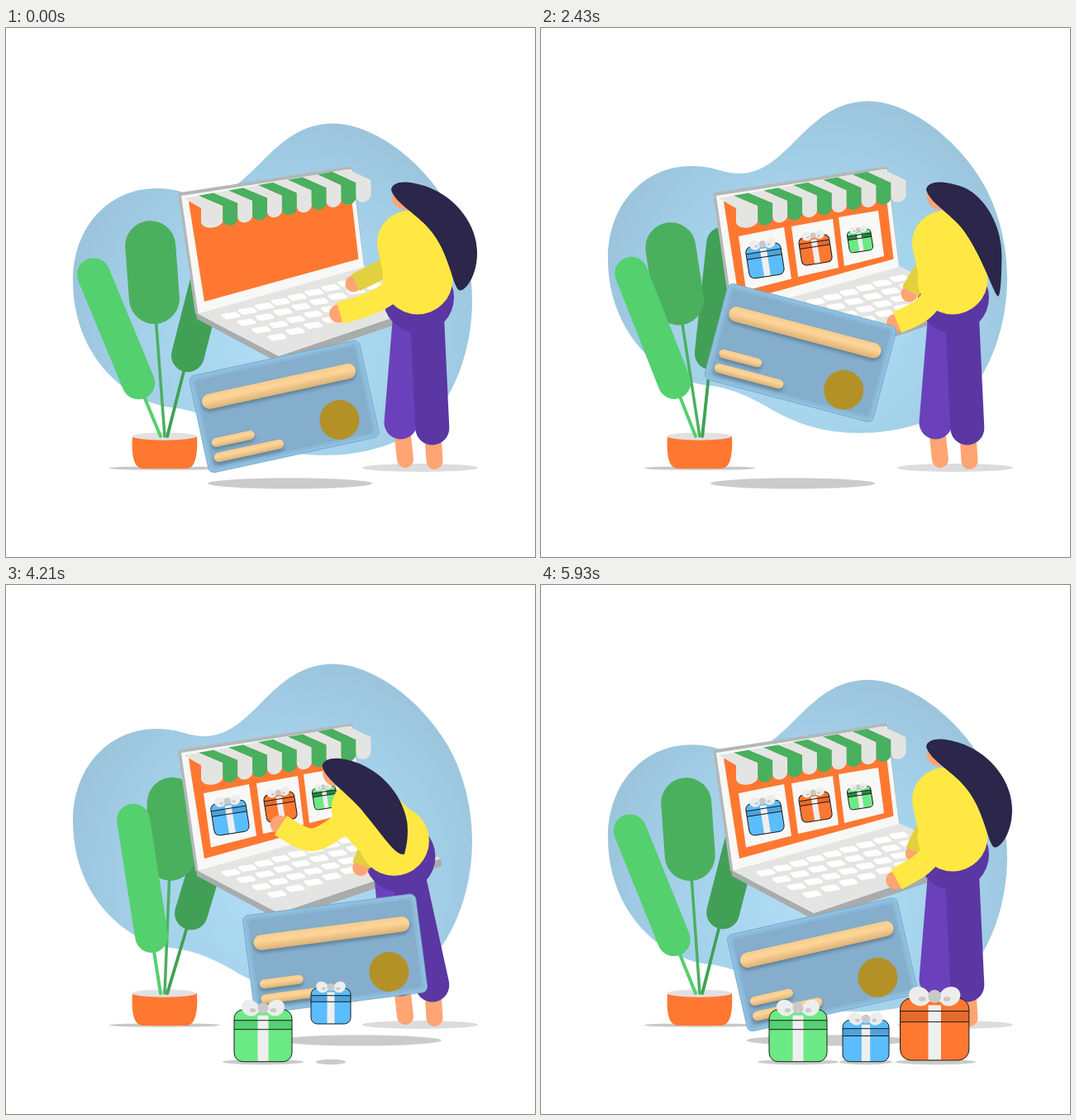
Animation of 640 by 640 pixels, one loop 6 s. Source, as an HTML page with a canvas:

```html
<!DOCTYPE html>
<html lang="en">
<head>
<meta charset="utf-8">
<title>Online shopping</title>
<style>
html, body { margin: 0; width: 100%; height: 100%; overflow: hidden; background: #fff; }
canvas { display: block; width: 640px; height: 640px; }
</style>
</head>
<body>
<canvas id="stage" width="640" height="640"></canvas>
<script>
const g = document.getElementById('stage').getContext('2d');
const LOOP = 6000, STEP = LOOP / 84, RAD = Math.PI / 180;
const ORANGE = '#ff7831', SKIN = '#ffa573', YELLOW = '#ffe844', PURPLE = '#5a37a2', PALE = '#e4e5e3';

// Value rows at time t. Each row is [time, ...values].
function track(rows, t, mode) {
  const last = rows.length - 1;
  if (t <= rows[0][0]) return rows[0].slice(1);
  if (t >= rows[last][0]) return rows[last].slice(1);
  let i = 0;
  while (t >= rows[i + 1][0]) i++;
  const a = rows[i], b = rows[i + 1], span = b[0] - a[0];
  let u = (t - a[0]) / span;
  if (mode === 'ease') u = u * u * (3 - 2 * u);
  if (mode !== 'smooth') return a.slice(1).map((v, k) => v + (b[k + 1] - v) * u);
  const p = rows[i - 1] || rows[last - 1], n = rows[i + 2] || rows[1];
  const tp = i ? p[0] : p[0] - LOOP, tn = i + 2 <= last ? n[0] : n[0] + LOOP;
  return a.slice(1).map((v, j) => {
    const k = j + 1, w = b[k];
    const m0 = (w - p[k]) / (b[0] - tp) * span, m1 = (n[k] - v) / (tn - a[0]) * span;
    const u2 = u * u, u3 = u2 * u;
    return (2 * u3 - 3 * u2 + 1) * v + (u3 - 2 * u2 + u) * m0 + (3 * u2 - 2 * u3) * w + (u3 - u2) * m1;
  });
}

function fill(color, path) { g.fillStyle = color; g.fill(path); }
function poly(color, ...xy) {
  g.beginPath();
  for (let i = 0; i < xy.length; i += 2) g.lineTo(xy[i], xy[i + 1]);
  g.closePath();
  g.fillStyle = color;
  g.fill();
}
function oval(color, x, y, rx, ry = rx, turn = 0) {
  g.beginPath();
  g.ellipse(x, y, rx, ry, turn, 0, 7);
  g.fillStyle = color;
  g.fill();
}
function line(color, width, x1, y1, x2, y2, cap = 'round') {
  g.beginPath();
  g.moveTo(x1, y1);
  g.lineTo(x2, y2);
  g.lineCap = cap;
  g.lineWidth = width;
  g.strokeStyle = color;
  g.stroke();
}
function box(color, x, y, w, h, r) {
  g.beginPath();
  g.roundRect(x, y, w, h, r);
  g.fillStyle = color;
  g.fill();
}
function place(x, y, turn, scale, draw) {
  g.save();
  g.translate(x, y);
  g.rotate(turn * RAD);
  g.scale(scale, scale);
  draw();
  g.restore();
}

const blob = new Path2D('M396 115.5C440 115.5 500 155 535 215C556 252 564 295 564 330C564 385 545 440 515 472C480 505 430 517 385 517C340 517 310 505 283 491C255 474 230 462 200 459C150 454 81 400 81 306C81 240 125 194 182 194C210 194 220 203 240 203C300 203 320 115.5 396 115.5Z');
const blobTone = g.createRadialGradient(335, 385, 20, 335, 370, 270);
blobTone.addColorStop(0, '#b0dcf6');
blobTone.addColorStop(.5, '#a6d3ec');
blobTone.addColorStop(1, '#9bc4dc');

const pot = new Path2D('M153 494C152 510 152 533 166 533H218C231 533 232 510 231 494Z');

function drawBlob(t) {
  g.save();
  g.translate(0, -33.5 * (1 - Math.abs(t / 3000 - 1)));
  fill(blobTone, blob);
  g.restore();
}

const SWAY = [[0, 22.5, 4.3, 14.3], [2000, 25.4, 12, 3.2], [4000, 7.3, -3.1, 17], [6000, 22.5, 4.3, 14.3]];

function leaf(color, x, turn, base, tip, r, stem) {
  place(x, 494, turn, 1, () => {
    line(color, stem, 0, 0, 0, -base);
    line(color, r * 2, 0, -base, 0, -tip);
  });
}
function drawPlant(t) {
  const [a, b, c] = track(SWAY, t);
  oval('#c8c8c8', 192, 532.5, 67, 2.3);
  fill(ORANGE, pot);
  oval('#e1e1e1', 191.5, 494, 39, 4.7);
  line('#54d06e', 3.5, 195.5, 494, 195 + 90 * Math.sin(c * RAD), 494 - 90 * Math.cos(c * RAD));
  leaf('#41a055', 195, c, 101, 235, 20, 3.5);
  leaf('#4ab05e', 192, -b, 167, 231, 30.5, 3.5);
  leaf('#54d06e', 187, -a, 70, 212, 20, 4);
}

// Keyboard rows: first key, last key, key count.
const KEYS = [[272, 348, 433, 303, 9], [291, 356, 445, 312, 8], [309, 365, 455, 321, 8], [328, 374, 460, 331, 7]];

function drawKeys() {
  g.beginPath();
  for (const [x1, y1, x2, y2, n] of KEYS)
    for (let i = 0; i < n; i++) {
      const u = i / (n - 1), x = x1 + (x2 - x1) * u, y = y1 + (y2 - y1) * u;
      g.moveTo(x - 9.7, y - .4);
      g.lineTo(x + 5.3, y - 2.8);
      g.lineTo(x + 9.7, y + .4);
      g.lineTo(x - 5.3, y + 2.8);
      g.closePath();
    }
  g.lineJoin = 'round';
  g.lineWidth = 3.4;
  g.fillStyle = g.strokeStyle = '#fff';
  g.fill();
  g.stroke();
}

function drawAwning() {
  for (let i = 0; i < 11; i++) {
    const x = 215 + 18 * i, y = 206 - 3.2 * i, drop = 241.5 - 3.1 * i;
    const l = i ? 244.4 + 17.9 * i : 236, r = 262.3 + 17.9 * i, bend = 218 - 3.1 * i;
    g.beginPath();
    g.moveTo(x, y);
    g.lineTo(x + 18.3, y - 3.2);
    g.lineTo(r, bend - 3.1);
    g.lineTo(r + .3, drop - 10);
    g.bezierCurveTo(r, drop + 2, l + 1, drop + 4, l, drop - 7);
    g.lineTo(l, bend);
    g.closePath();
    g.fillStyle = i % 2 ? '#48b05f' : PALE;
    g.fill();
  }
}

const BOX_BLUE = ['#5bbdfd', '#4da3dd'], BOX_ORANGE = [ORANGE, '#e66a2b'];
const BOX_GREEN = ['#6cea85', '#55d073'], BOX_DEEP = ['#6cea85', '#35804a'];

// Gift box standing on the origin, 70 wide and 63 high.
function gift([body, band], scale) {
  g.lineWidth = 1 / scale;
  g.strokeStyle = '#1c1c1c';
  box(body, -35, -63, 70, 63, 11);
  g.fillStyle = band;
  g.fillRect(-35, -50, 70, 11);
  g.fillStyle = '#efefef';
  g.fillRect(-6.5, -56, 13, 55.5);
  g.beginPath();
  g.roundRect(-35, -63, 70, 63, 11);
  for (const y of [-50, -39]) { g.moveTo(-35, y); g.lineTo(35, y); }
  g.stroke();
  for (const s of [-1, 1]) {
    oval('#ededed', s * 15.5, -65, 11, 9.5, s * -.5);
    oval('#ededed', s * 9, -64, 9, 5);
    oval('#c9c9c9', s * 12.5, -62.3, 3.6, 2.5);
  }
  oval('#c9c9c9', 0, -65, 6.6);
}

const SHELF = [
  { panel: [239, 252, 294, 241, 303, 303.5, 248, 317.5], x: 271, y: 281.5, size: .61, tone: BOX_BLUE, from: 1400 },
  { panel: [303, 240, 353, 231, 360, 290, 311, 301], x: 332, y: 268.5, size: .53, tone: BOX_ORANGE, from: 1400 },
  { panel: [360, 229, 408, 221, 415, 276, 367, 288], x: 386, y: 257.5, size: .41, tone: BOX_DEEP, from: 1475 }
];

function drawShelf(t) {
  SHELF.forEach((s, i) => {
    const [alpha] = track([[1000 + i * 80, 0], [1240 + i * 80, 1]], t);
    let [pop] = track([[s.from, 0], [s.from + 408, 1]], t);
    if (i === 1) pop *= track([[4400, 1], [4710, 1.4], [5000, 1]], t)[0];
    if (!alpha) return;
    g.globalAlpha = alpha;
    poly('#f8f8f7', ...s.panel);
    g.globalAlpha = 1;
    const k = s.size * pop;
    if (k) place(s.x, s.y, -9, k, () => { g.translate(0, 31.5); gift(s.tone, k); });
  });
}

function drawLaptop(t) {
  poly('#aaabab', 230, 345, 231, 352, 332, 406, 527, 340, 526, 331, 330, 397);
  poly(PALE, 232, 346, 433, 288, 526, 331, 330, 397);
  drawKeys();
  poly('#b3b7b9', 208, 199.5, 417, 167.5, 420, 171, 433, 288, 233, 346, 229, 346);
  poly('#f8f8f7', 212, 203, 418.5, 171, 433, 289, 232.5, 346);
  poly(ORANGE, 221, 210, 415, 180, 426.5, 279.5, 240, 331);
  drawShelf(t);
  drawAwning();
}

// Hair outlines: hanging, pulled in, swung back.
const HANG = [466,196, 468,183,490,185,512,193, 545,206,570,238,570,272, 570,300,556,318,549,317.5, 541,316,537,275,516,248, 500,226,472,214,466,196];
const SLIM = [466,196, 468,183,490,185,512,193, 538,205,557,240,557,275, 557,300,556,325,553,325, 548,322,536,282,514,249, 499,226,472,214,466,196];
const SWING = [467,196, 469,183,492,183,512,193, 540,207,556,228,568,251, 574,262,582,272,591,280, 575,287,545,287,522,263, 500,235,470,214,467,196];
const HAIR = [[0, 0, 0], [2500, 1, 0], [3200, 0, 0], [3790, 0, 1], [4500, 0, 0], [5050, 0, 0], [5400, 0, .7], [5800, 0, 0]];
const LEAN = [[3250, 0], [3790, .62], [4500, 1], [4750, 1], [5450, 0]];

// Arms: shoulder, elbow, wrist.
const NEAR = [
  [0, 480, 310, 446, 333, 404, 345], [860, 480, 310, 440, 331, 385, 330],
  [1710, 480, 325, 470, 355, 431, 356], [2430, 480, 318, 462, 343, 431, 356],
  [3250, 480, 318, 462, 343, 431, 356], [3790, 432, 285, 390, 305, 335, 314],
  [4500, 405, 282, 360, 321, 331, 278], [4750, 405, 282, 360, 321, 331, 278],
  [5450, 480, 318, 460, 340, 430, 356]
];
const FAR = [
  [0, 478, 278, 452, 294, 423, 308], [860, 478, 278, 448, 292, 414, 306],
  [1710, 472, 285, 460, 300, 452, 326], [2430, 474, 282, 460, 296, 447, 319],
  [3250, 474, 282, 460, 296, 447, 319], [3790, 452, 305, 442, 318, 436, 334],
  [4500, 440, 316, 432, 328, 427, 342], [4750, 440, 316, 432, 328, 427, 342],
  [5450, 474, 285, 462, 300, 452, 322]
];

function arm(rows, t, color, width, hand, reach) {
  const [sx, sy, ex, ey, wx, wy] = track(rows, t, 'ease');
  const d = Math.hypot(wx - ex, wy - ey) || 1;
  oval(SKIN, wx + (wx - ex) / d * reach, wy + (wy - ey) / d * reach, hand);
  g.beginPath();
  g.moveTo(sx, sy);
  g.bezierCurveTo(ex, ey, ex, ey, wx, wy);
  g.lineCap = 'butt';
  g.lineJoin = 'round';
  g.lineWidth = width;
  g.strokeStyle = color;
  g.stroke();
}

function drawHair(t, q) {
  const [slim, swing] = track(HAIR, t);
  const p = HANG.map((v, i) => v + slim * (SLIM[i] - v) + swing * (SWING[i] - v));
  g.save();
  g.translate(-97 * q, 27 * q);
  g.beginPath();
  g.moveTo(p[0], p[1]);
  for (let i = 2; i < p.length; i += 6) g.bezierCurveTo(...p.slice(i, i + 6));
  g.fillStyle = '#2b264a';
  g.fill();
  g.restore();
}

function drawWoman(t) {
  const [q] = track(LEAN, t, 'ease');
  const hx = -26 * q, hy = 3 * q;
  line(SKIN, 20, 479.5, 490, 483, 522);
  line(SKIN, 20, 517, 500, 518.5, 524);
  line('#6a41bb', 40, 488 + hx, 350 + hy, 477.5, 477.5);
  line(PURPLE, 41, 509.5 + hx, 350 + hy, 515.8, 484);
  oval(PURPLE, 499 + hx, 326 + hy, 43);
  arm(FAR, t, '#e3d03f', 23, 10, 3);
  oval(SKIN, 483 - 97 * q, 204 + 27 * q, 16);
  const bx = 498 - 33 * q, by = 304 + 6 * q;
  line(YELLOW, 78, 488 - 64 * q, 260 + 12 * q, bx, by);
  oval(YELLOW, bx, by, 42.5);
  arm(NEAR, t, YELLOW, 27.5, 11, 2);
  drawHair(t, q);
}

const CARD = [
  [0, 336.5, 458, -12.3], [860, 283.5, 411, 7.1], [1710, 274.5, 397.5, 12.7], [2430, 314, 393, 14.8],
  [3790, 387, 437, -3.9], [4710, 396.5, 453, -9.8], [6000, 336.5, 458, -12.3]
];
const CARD_SHADE = [[0, 343.5], [1750, 258], [4486, 446], [6000, 343.5]];

function bar(x, y, w, h) {
  g.save();
  g.shadowColor = 'rgba(60,90,115,.55)';
  g.shadowBlur = 4;
  g.shadowOffsetY = 3;
  const tone = g.createLinearGradient(0, y, 0, y + h);
  tone.addColorStop(0, '#f6cc8f');
  tone.addColorStop(.4, '#ffd698');
  tone.addColorStop(1, '#dcb277');
  box(tone, x, y, w, h, h / 2);
  g.restore();
}

function drawCard(t) {
  const [x, y, turn] = track(CARD, t, 'smooth');
  place(x, y, turn, 1, () => {
    box('#8fc0df', -105.5, -60, 211, 120, 7);
    g.lineWidth = .8;
    g.strokeStyle = '#76a8c9';
    g.stroke();
    box('#8ab8d6', -102, -56.5, 204, 113, 5);
    box('#84aecb', -99, -53.5, 198, 107, 4);
    bar(-96, -34.5, 190, 18.5);
    bar(-95, 19.5, 53, 11);
    bar(-96, 37.5, 86, 11.5);
    oval('#b39127', 62, 30, 24);
  });
}

const PARCELS = [
  { x: 311, size: 1, tone: BOX_GREEN, from: 3000, shade: 49 },
  { x: 393, size: .8, tone: BOX_BLUE, from: 4000, shade: 32 },
  { x: 476.2, size: 1.19, tone: BOX_ORANGE, from: 4300, shade: 48.5 }
];

function drawParcels(t) {
  const shown = PARCELS.filter(p => t > p.from).map(p => ({
    ...p,
    lift: 60 * Math.max(0, 1 - (t - p.from) / 900),
    k: p.size * Math.min(1, (t - p.from) / 250)
  }));
  for (const p of shown) oval('#cbcbcb', p.x + (p.size > 1 ? 1.3 : 0), 577, p.shade * (1 - p.lift * .0095), 3.3);
  for (const p of shown) place(p.x, (p.size > 1 ? 575 : 576.7) - p.lift, 0, p.k, () => gift(p.tone, p.k));
}

function draw(t) {
  g.fillStyle = '#fff';
  g.fillRect(0, 0, 640, 640);
  drawBlob(t);
  oval('#dcdcdc', 501, 532, 70, 5);
  drawPlant(t);
  oval('#cbcbcb', track(CARD_SHADE, t)[0], 551, 99.5, 6.5);
  drawLaptop(t);
  drawWoman(t);
  drawCard(t);
  drawParcels(t);
}

function tick() {
  const t = performance.now() % LOOP;
  draw(Math.floor((t + 5) / STEP) % 84 * STEP);
  requestAnimationFrame(tick);
}
tick();
</script>
</body>
</html>
```
